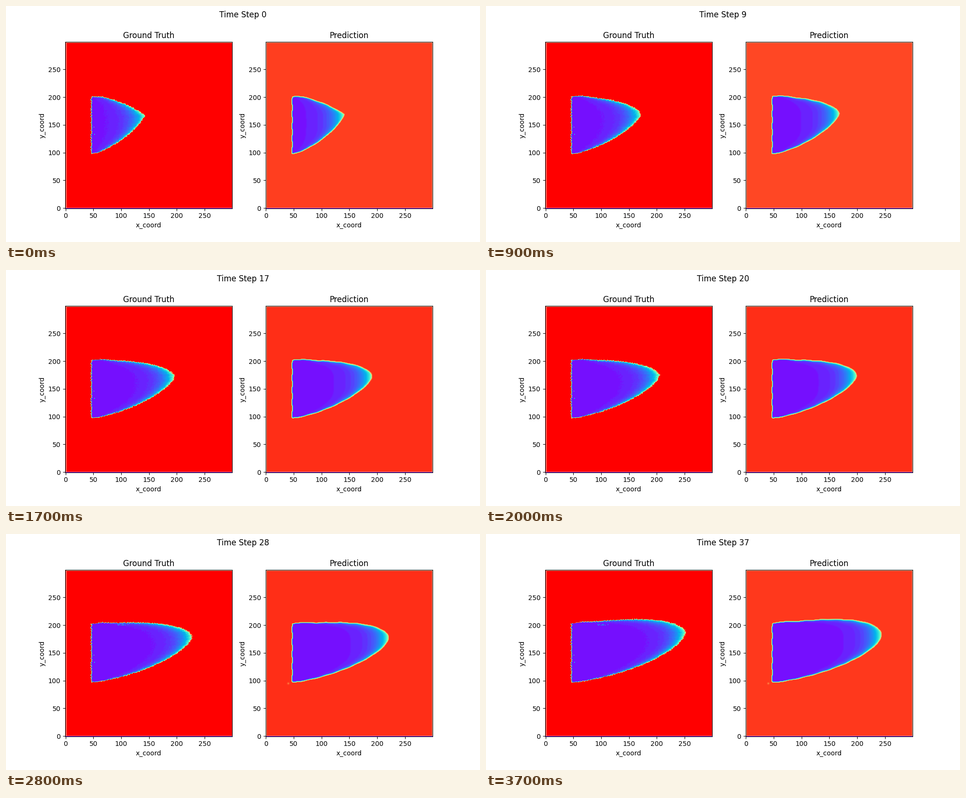
A matplotlib script that plays this animation: 1000x500 px, repeating every 3800 ms.

```python
import numpy as np
import matplotlib.pyplot as plt
from matplotlib.animation import FuncAnimation

N = 300
STEPS = 38
LEFT = 47

rng = np.random.default_rng(4)
row_jitter = rng.uniform(-1.2, 1.2, (N, 1))
col_jitter = rng.uniform(-.8, .8, (1, N))
grain = rng.uniform(-1, 1, (N, N))
rim = rng.uniform(.2, .85, (N, N))
teeth = rng.choice([45, 46, 47, 47, 47], (N, 1))
Y, X = np.mgrid[:N, :N].astype(float)


def nose(s, n, m):
    """Falls from 1 at the base to 0 at the tip."""
    return (1 - s**n) ** m


def burn(step, tip, x, y, blunt, box):
    """Inside mask, depth behind the front and value of each cell."""
    p = step / (STEPS - 1)
    tip_x, tip_y = tip
    length = tip_x - LEFT
    s = np.clip((x - LEFT) / length, 0, 1)

    round_off = blunt + (1 - blunt) * np.exp(-step / 5)
    height = 200 + 2 * p - tip_y + 22 * p**2 * s
    lump = 2 * np.exp(-((x - 64) / 14) ** 2)
    up = tip_y + height * nose(s, 2 + .5 * p, round_off) + lump
    lo = tip_y - (tip_y - 98 + p) * nose(s, 1.4, .75 - .15 * p)

    v = (2 * y - up - lo) / (up - lo)
    inside = (np.abs(v) < 1) & (s < 1)
    v = np.clip(np.abs(v), 0, 1)
    depth = length * (1 - s / (1 - v**box * (1 - s) + 1e-6))
    depth = np.maximum(depth, 0)
    return inside, depth, .022 + .4 * np.exp(-depth / 19)


def banded(val, size=.022):
    return np.round(val / size) * size


def truth(step):
    tip = 142.5 + 3.3 * step - .01 * step**2, 168 + .014 * step**2
    inside, depth, val = burn(step, tip, X + row_jitter, Y + col_jitter, .55, 2.5)
    inside &= X >= teeth
    val = banded(val * (1 + .1 * grain))
    val += .5 * rim * np.exp(-depth / 2.5)
    val = np.where(X < teeth + 1, rim, val)
    val[[146, 133], [51, 52]] = .6
    if step >= 18:
        streak = (np.abs(X - 102) < 11) & (np.abs(Y - 200.5) < 1.2)
        val[streak & (grain > .7)] = .4
    z = np.where(inside, val, 1)
    z[0] = 0
    return z


def soften(z):
    for axis in (0, 1):
        z = (np.roll(z, 1, axis) + 2 * z + np.roll(z, -1, axis)) / 4
    return z


def guess(step):
    tip = 140.3 + 3.05 * step - .0075 * step**2, 169 + .0095 * step**2
    level = .921 - .021 * np.sin(2.25 * np.pi * (1 - np.exp(-step / 20)))
    wave = .3 * np.sin(X / 4.5)
    inside, depth, val = burn(step, tip, X, Y + wave, .47, 4)
    inside &= X >= LEFT + .5 * np.sin(Y / 3.5)
    val = banded(val) + .2 * np.exp(-depth / 2.5)
    z = soften(np.where(inside, val, level))
    if step >= 26:
        z -= .12 * np.exp(-((X - 40) ** 2 + (Y - 95) ** 2) / 2.5)
    z[0] = 0
    return z


fig, axes = plt.subplots(1, 2, figsize=(10, 5), dpi=100)
heading = fig.suptitle("Time Step 0")
panels = []
for ax, name, field in zip(axes, ("Ground Truth", "Prediction"), (truth, guess)):
    image = ax.imshow(field(0), cmap="rainbow", vmin=0, vmax=1, origin="lower")
    ax.set(title=name, xlabel="x_coord", ylabel="y_coord")
    ax.set_xticks(range(0, N, 50))
    ax.set_yticks(range(0, N, 50))
    # pale hairline just inside the left, top and right spines
    ax.plot([.78, .78, 298.86, 298.86], [.5, 298.55, 298.55, .5],
            color="#ffc8aa", lw=.72, scalex=False, scaley=False)
    panels.append((image, field))


def update(step):
    heading.set_text(f"Time Step {step}")
    for image, field in panels:
        image.set_data(field(step))
    return [heading] + [image for image, _ in panels]


anim = FuncAnimation(fig, update, frames=STEPS, interval=100, repeat=True,
                     repeat_delay=0, blit=False)
plt.show()
```
